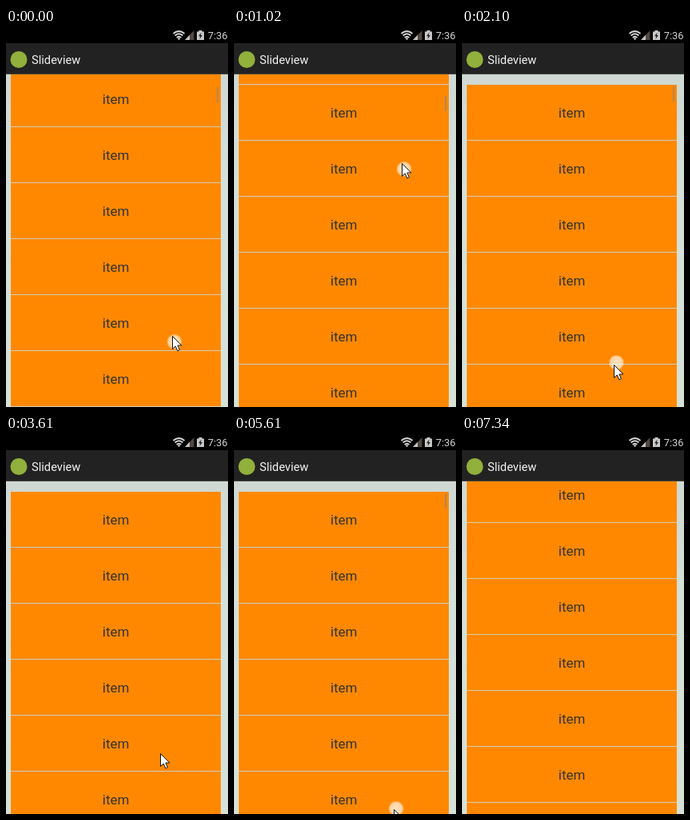
Recreate the animation shown at these times as an HTML page. Size 278x474 px, loop 7.59 s.

```html
<!DOCTYPE html>
<html lang="en">
<head>
<meta charset="utf-8">
<title>Slideview</title>
<style>
  html, body { margin: 0; width: 100%; height: 100%; overflow: hidden; background: #000; }
  svg { display: block; width: 278px; height: 474px; }
  text { font-family: Roboto, "Noto Sans", sans-serif; }
</style>
</head>
<body>
<svg viewBox="0 0 278 474" xmlns="http://www.w3.org/2000/svg">
  <defs>
    <linearGradient id="wall" x1="0" y1="0" x2="0" y2="1">
      <stop offset="0" stop-color="#cfd8d2"/>
      <stop offset=".35" stop-color="#d3e1d9"/>
      <stop offset="1" stop-color="#d6e2d7"/>
    </linearGradient>
    <radialGradient id="glow">
      <stop offset="0" stop-color="#fff" stop-opacity=".75"/>
      <stop offset=".75" stop-color="#fff" stop-opacity=".65"/>
      <stop offset="1" stop-color="#fff" stop-opacity=".08"/>
    </radialGradient>
    <clipPath id="view"><rect y="58" width="278" height="416"/></clipPath>
  </defs>

  <rect y="58" width="278" height="416" fill="url(#wall)"/>
  <g clip-path="url(#view)">
    <g id="rows"></g>
    <rect id="bar" x="264" width="2" height="19" fill="#858585"/>
  </g>

  <rect width="278" height="19" fill="#000"/>
  <rect y="19" width="278" height="39" fill="#222"/>
  <rect y="57" width="278" height="1" fill="#45433f"/>
  <circle cx="16" cy="39.5" r="10.5" fill="#91b03c"/>
  <text x="32" y="44.5" font-size="14.7" fill="#f3f3f3">Slideview</text>

  <g fill="none" stroke="#d4d4d4" stroke-width="1.9">
    <path d="M209.5 7Q216.5 .8 223.5 7M211.6 9.5Q216.5 5 221.4 9.5M213.7 12Q216.5 9.4 219.3 12"/>
  </g>
  <path d="M214.8 13Q216.5 11.6 218.2 13L216.5 15.3Z" fill="#d4d4d4"/>
  <path d="M224 15H235.5V3Z" fill="#51483f"/>
  <path d="M224 15H230V8.7Z" fill="#c4c4c4"/>
  <path d="M239 4.5H241.5V3H245.5V4.5H248V15H239Z" fill="#c9c9c9"/>
  <path d="M244.6 5.5L241 10.2H243.2L242.4 14L246 9H243.8Z" fill="#222"/>
  <text x="277.5" y="14.3" font-size="12.8" fill="#d4d4d4" text-anchor="end">7:36</text>

  <circle id="touch" r="9.8" fill="url(#glow)"/>
  <path id="arrow" d="M.5 .5V16.5L4.2 13L6.8 18.8L9.4 17.6L6.9 12H11.8Z" fill="#fff" stroke="#111" stroke-linejoin="round"/>
</svg>
<script>
const LOOP = 7590, TICK = 140, LAG = 20;
const ROW = 70, TOP = 71, VIEW = 58;
const FIRST_UP = 2240, PRESS = 4200, LAST_UP = 6720;
const $ = id => document.getElementById(id);

// Turning points of the pointer tip: time, x, y
const PATH = [[0, 208, 385], [980, 210, 169], [1120, 211, 150], [2100, 190, 421],
  [2800, 194, 470], [3500, 193, 398], [PRESS, 189, 405], [4760, 200, 310],
  [5600, 200, 468], [6300, 204, 340], [LAST_UP, 205, 369], [7280, 206, 480], [LOOP, 206, 490]];

const clamp = (v, low, high) => Math.min(high, Math.max(low, v));

function pointer(t) {
  const n = Math.max(1, PATH.findIndex(p => p[0] > t));
  const [t0, x0, y0] = PATH[n - 1], [t1, x1, y1] = PATH[n];
  const k = (t - t0) / (t1 - t0);
  return { x: x0 + (x1 - x0) * k, y: y0 + (y1 - y0) * k };
}

function addNode(parent, tag, attrs) {
  const node = document.createElementNS("http://www.w3.org/2000/svg", tag);
  for (const key in attrs) node.setAttribute(key, attrs[key]);
  return parent.appendChild(node);
}

const rows = $("rows");
for (let i = 0; i < 8; i++) {
  const y = i * ROW;
  addNode(rows, "rect", { x: 6, y, width: 263, height: ROW - 1, fill: "#ff8800" });
  addNode(rows, "rect", { x: 6, y: y + ROW - 1, width: 263, height: 1, fill: "#d0cdb8" });
  addNode(rows, "text", { x: 137.5, y: y + 41, "font-size": 16.9, fill: "#333", "text-anchor": "middle" })
    .textContent = "item";
}

const move = (id, x, y) => $(id).setAttribute("transform", `translate(${x} ${y})`);

function draw(time) {
  const t = Math.floor(time / TICK) * TICK;
  const tip = pointer(t), trail = pointer(t - LAG);

  // The list follows the pointer only while it is pressed.
  const contact = t < FIRST_UP ? t : clamp(t, PRESS, LAST_UP);
  const scroll = Math.round(Math.max(0, (404 - pointer(contact).y) * 0.893));
  const passed = Math.max(0, Math.floor((scroll - TOP + VIEW) / ROW));
  move("rows", 0, TOP - scroll + passed * ROW);

  const pressed = t === contact;
  const idle = pressed ? 0 : t - (t < PRESS ? FIRST_UP : LAST_UP);
  $("bar").setAttribute("y", Math.round(72.6 + scroll * 0.06));
  $("bar").setAttribute("opacity", 0.6 * clamp(1.5 - idle / 280, 0, 1));

  move("arrow", Math.round(tip.x), Math.round(tip.y));
  move("touch", trail.x + 3, trail.y + 3);
  $("touch").setAttribute("visibility", pressed ? "visible" : "hidden");
}

const start = performance.now();
function tick() {
  draw((performance.now() - start) % LOOP);
  requestAnimationFrame(tick);
}
tick();
</script>
</body>
</html>
```
